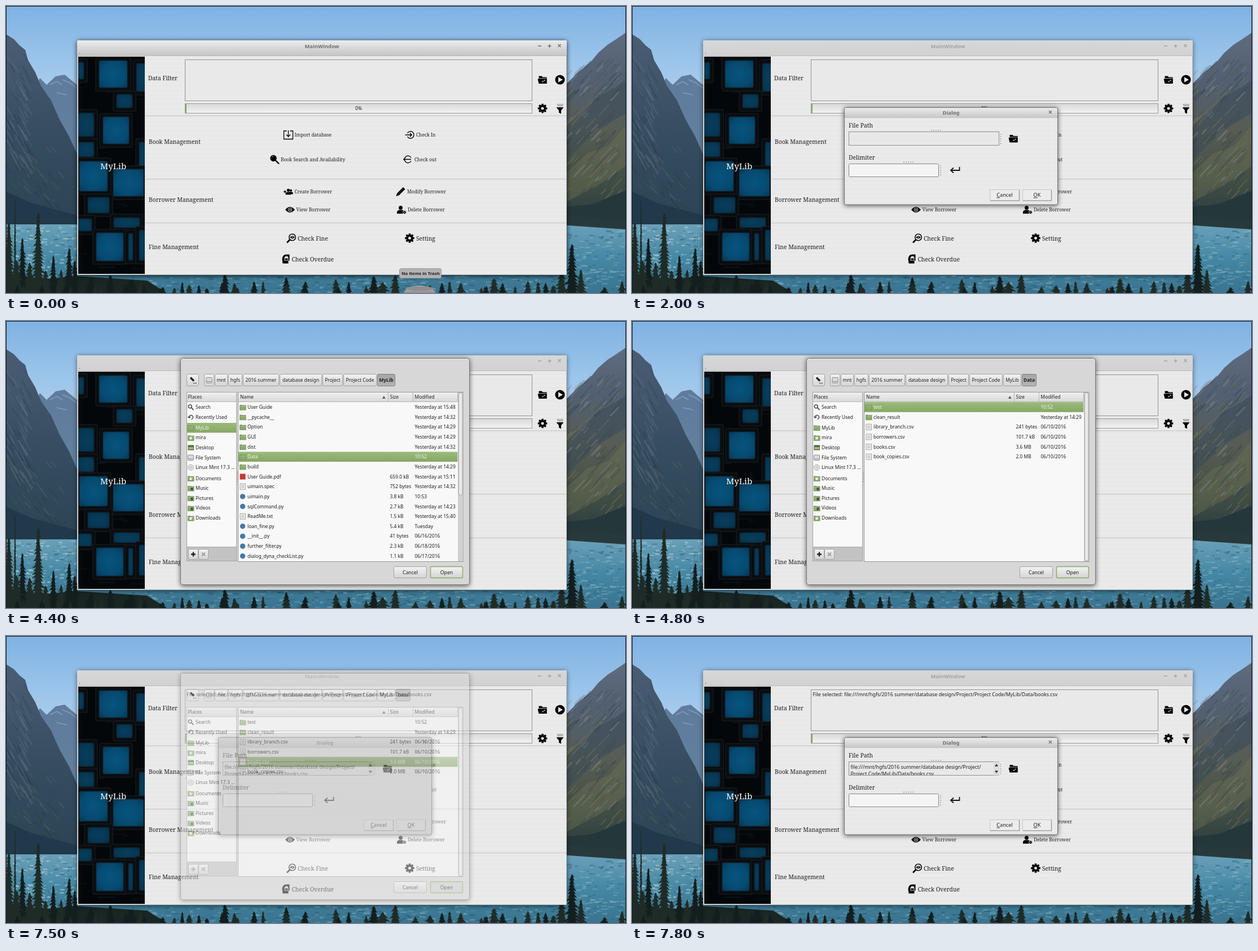
An HTML page that plays this animation: 1099x510 px, repeating every 8000 ms.

```html
<!DOCTYPE html>
<html lang="en">
<head>
<meta charset="utf-8">
<title>Library manager</title>
<style>
html, body { margin: 0; width: 1099px; height: 510px; overflow: hidden; background: #000; }
svg { display: block; }
text { white-space: pre; fill: #1e1e1e; font: 8.45px "Noto Sans", sans-serif; }
.h { font: 10.3px "Noto Serif", serif; }
.s { font: 8.35px "Noto Serif", serif; }
.q { font-size: 8.86px; }
.d { font-size: 9.2px; }
.w { font: bold 9.4px "Noto Sans", sans-serif; }
.b { font-weight: bold; }
.m { text-anchor: middle; }
.sel { fill: #f1f6ea; }
.logo { font: 15.1px "Noto Serif", serif; fill: #fff; }
</style>
</head>
<body>
<svg id="stage" width="1099" height="510" viewBox="0 0 1099 510"></svg>
<script>
const LOOP = 8000;
let seed = 7;
const rnd = () => (seed = (seed * 16807) % 2147483647) / 2147483647;
const many = (n, f) => Array.from({ length: n }, (_, i) => f(i)).join('');

const rect = (x, y, w, h, fill, more = '') => `<rect x="${x}" y="${y}" width="${w}" height="${h}" fill="${fill}" ${more}/>`;
const path = (d, fill, more = '') => `<path d="${d}" fill="${fill}" ${more}/>`;
const line = (d, col = '#000', w = 1.5, more = '') => path(d, 'none', `stroke="${col}" stroke-width="${w}" ${more}`);
const circle = (x, y, r, fill, more = '') => `<circle cx="${x}" cy="${y}" r="${r}" fill="${fill}" ${more}/>`;
const text = (x, y, s, cls = '', more = '') => `<text x="${x}" y="${y}" class="${cls}" ${more}>${s}</text>`;
const group = (id, body, more = '') => `<g id="${id}" ${more}>${body}</g>`;
const at = (x, y, body) => `<g transform="translate(${x} ${y})">${body}</g>`;
const edge = (col, r = 0) => `stroke="${col}" rx="${r}"`;
const grad = (id, ...cols) => `<linearGradient id="${id}" x2="0" y2="1">` +
  cols.map((c, i) => `<stop offset="${i / (cols.length - 1)}" stop-color="${c}"/>`).join('') + '</linearGradient>';

const defs = `<defs>
${grad('sky', '#7fb2e3', '#9cc5ea', '#b7d3e8')}
${grad('lake', '#6aa0b8', '#4587a3', '#39738f')}
${grad('ridge', '#4a5d74', '#374d61', '#2b4454')}
${grad('far', '#5f7b9d', '#62809e', '#496780')}
${grad('cliff', '#5f6c80', '#525f70', '#575d54', '#444f45', '#27393e')}
${grad('titleOn', '#ececec', '#c5c5c5')}
${grad('titleOff', '#d7d7d7', '#d2d2d2')}
${grad('btn', '#f3f3f3', '#d4d4d4')}
${grad('down', '#a5a5a5', '#b5b5b5')}
${grad('green', '#9bbb7b', '#86a765')}
${grad('head', '#f0f0f0', '#d8d8d8')}
${grad('trough', '#d9d9d9', '#f2f2f2')}
${grad('can', '#bdbdbd', '#5c5c5c')}
<radialGradient id="glow" r=".75"><stop stop-color="#07547e"/><stop offset=".6" stop-color="#064a70"/><stop offset="1" stop-color="#043350"/></radialGradient>
<pattern id="pin" width="8" height="8" patternUnits="userSpaceOnUse">${rect(0, 0, 8, 8, '#e8e8e8') + rect(0, 0, 8, 4, '#eaeaea')}</pattern>
<filter id="blur" x="-10%" y="-10%" width="120%" height="125%"><feGaussianBlur stdDeviation="4"/></filter>
<clipPath id="side"><rect x="128" y="90" width="118" height="386"/></clipPath>
<clipPath id="field"><rect x="385" y="224" width="256" height="23"/></clipPath>
</defs>`;

// Landscape
function tree(x, top, half) {
  const n = Math.ceil((514 - top) / 6);
  let left = '', right = '';
  for (let i = 1; i <= n; i++) {
    const y = top + i * 6, w = half * Math.min(1, i / n + .2);
    left = ` L${x - w * .45} ${y - 1} L${x - w * (.6 + rnd() * .7)} ${y}` + left;
    right += ` L${x + w * (.6 + rnd() * .7)} ${y} L${x + w * .45} ${y - 1}`;
  }
  return path(`M${x} ${top}${right}${left}Z`, rnd() > .5 ? '#141e1e' : '#1f2b26');
}
const streaks = (n, x, y, w, h, dx, dy, cols, more = 'opacity=".4"') => many(n, () => {
  const px = x + rnd() * w, py = y + rnd() * h, k = .4 + rnd();
  return line(`M${px} ${py}l${dx * k} ${dy * k}`, cols[rnd() * cols.length | 0], 1 + rnd() * 2, more);
});
const trees = [[5, 385, 12], [16, 345, 3], [29, 412, 10], [57, 367, 12], [42, 455, 12], [84, 443, 9], [98, 468, 9],
  [112, 430, 10], [122, 452, 9], [18, 452, 15], [70, 470, 12], [150, 482, 12], [185, 478, 9], [222, 486, 14],
  [388, 477, 11], [405, 492, 9], [497, 481, 8], [585, 485, 9], [652, 480, 12], [690, 478, 11], [668, 490, 12],
  [865, 484, 11], [880, 492, 8], [925, 488, 8], [985, 462, 11], [1003, 423, 13], [1019, 468, 9], [1092, 488, 9]];

function landscape() {
  return rect(0, 0, 1099, 200, 'url(#sky)') + rect(0, 200, 1099, 190, '#587792') +
    path('M40 170L60 128L72 140L88 125L104 122L128 142V390H40Z', 'url(#far)') +
    line('M78 140l12-6 10 6M100 131l14 6 12 9M90 154l18 4', '#a4b7ca', 1.5, 'opacity=".55"') +
    path('M0 50L14 59L24 70L34 78L39 96L52 118L62 142L80 168L95 202L112 232L128 268V390H0Z', 'url(#ridge)') +
    streaks(60, 0, 85, 35, 200, 13, 24, ['#65798c', '#26394a', '#5d7078']) +
    streaks(45, 0, 240, 95, 115, 14, 16, ['#30495a', '#50685f', '#203744']) +
    path('M0 330L45 350L126 372V392H0Z', '#21394a') +
    path('M985 144L996 136L1014 118L1036 100L1050 83L1066 69L1080 60L1099 47V392H985Z', 'url(#cliff)') +
    path('M990 300L1030 262L1068 248L1099 212V284L1050 318L990 350Z', '#6f7355', 'opacity=".4"') +
    path('M990 230L1045 165L1099 132V190L1050 220L990 276Z', '#384858', 'opacity=".5"') +
    streaks(130, 1000, 95, 95, 235, -15, 16, ['#8a9099', '#33434f', '#77775f', '#3d4a43']) +
    path('M990 357L1040 352L1099 328V394L990 390Z', '#24373b') +
    rect(0, 388, 1099, 122, 'url(#lake)') + path('M985 372L1099 380V397L1040 393L985 389Z', '#28393b') +
    streaks(230, 0, 391, 126, 112, 7, 0, ['#a3c4d0', '#c0d7de', '#2c627c'], 'opacity=".5"') +
    streaks(150, 992, 400, 104, 105, 8, 0, ['#79aabd', '#286680', '#8fbac7'], 'opacity=".5"') +
    streaks(320, 126, 480, 868, 29, 8, 0, ['#8db6c3', '#245469', '#6199ad'], 'opacity=".5"') +
    path('M0 478L60 486L126 480L250 488L285 510H0Z', '#1a2623') +
    trees.map(a => tree(...a)).join('') +
    many(45, () => tree(rnd() * 1099, 488 + rnd() * 14, 5 + rnd() * 5)) +
    path('M.5 510V.5H1098.5V510', 'none', 'stroke="#10141a"');
}

// Icons, drawn around 0,0
const spin = (n, f) => many(n, i => `<g transform="rotate(${i * 360 / n})">${f}</g>`);
const gear = circle(0, 0, 4.4, 'none', 'stroke="#000" stroke-width="3.6"') + spin(8, rect(-1.8, -8.3, 3.6, 3.5, '#000', 'rx=".6"'));
const folder = path('M-6.500-6.500h5l2 2h7v11h-14z', '#000') + path('M-8.500-1.500H7.500V7H-6.500Z', '#000') +
  line('M-6.500-2.500H6.500', '#ddd', .8) + line('M0 4.500l4-4M-.5 2l1.500 2.500M3 0l1.500 2', '#ddd', 1);
const play = circle(0, 0, 8.6, '#000') + path('M-3-4.8L5 0L-3 4.8Z', '#eee');
const funnel = path('M-6.5-2.5H6.5L2 3V9L-2 7V3Z', '#000') + line('M-5-7.5H6M-4-5H5', '#000', 1.2, 'stroke-dasharray="1.3 1.3"');
const lens = circle(-2, -2, 5.7, '#000') + line('M2 2L8 8', '#000', 2.4) + line('M-5-3a3.5 3.5 0 0 1 3-3', '#ccc', .8);
const eye = path('M-8.5 0Q0-10 8.5 0Q0 10-8.5 0Z', '#000') + circle(0, 0, 3.2, '#000', 'stroke="#e8e8e8"') + circle(0, 0, 1.2, '#e8e8e8');
const person = circle(0, -3.6, 3.5, '#000') + path('M-6.5 7V4Q-6 1-2.5.5H2.5Q6 1 6.5 4V7Z', '#000');
const icons = {
  imp: line('M-3-7H-8V7.5H8V-7H3M0-8V3M-3.5-.5L0 3.2L3.5-.5', '#000', 1.3),
  enter: line('M-4.5-3A6.2 6.2 0 1 1-4.5 3M-8.5 0H3M0-3.2L3.2 0L0 3.2', '#000', 1.4),
  leave: line('M5-3A6.2 6.2 0 1 0 5 3M5 0H-8M-5-3.2L-8.200 0L-5 3.2', '#000', 1.4),
  lens,
  add: line('M-8.5 0H-3.5M-6-2.5V2.5', '#000', 1.4) + at(4.5, 0, `<g transform="scale(.6)">${person}</g>`) + at(0, 0, `<g transform="scale(.75)">${person}</g>`),
  pen: path('M-8 8L-6.5 3L4.5-8L8-4.5L-3 6.5Z', '#000') + line('M-5 4.5L5-5.5', '#777', .6),
  eye,
  del: at(-1.5, 0, person) + circle(5.5, 4.5, 3, '#000', 'stroke="#e8e8e8"') + line('M4.5 3.5l2 2m0-2l-2 2', '#fff', .7),
  find: circle(1.5, -1.5, 5.8, '#e8e8e8', 'stroke="#000" stroke-width="1.5"') + at(1.5, -1.5, `<g transform="scale(.5)">${eye}</g>`) + line('M-3 3L-8 8', '#000', 2.6),
  gear,
  due: path('M-6 8L-7 0Q-6-8 0-8H6V3H4V8Z', '#000') + path('M-3-1Q-3-5 1-5Q4-5 4-1V3H-3Z', '#e0e0e0') + rect(-2, -1, 5, 3, '#000')
};
const item = (icon, ix, iy, tx, label, cls = 's') => at(ix, iy, icons[icon]) + text(tx, iy + (cls === 's' ? 3 : 4), label, cls);

// Main window
const tiles = [[128, 100, 10, 30], [165, 97, 50, 48], [231, 102, 18, 50], [196, 157, 28, 24], [128, 190, 28, 42],
  [128, 242, 28, 26], [172, 197, 46, 48], [236, 242, 10, 64], [190, 290, 54, 48], [130, 276, 50, 53],
  [145, 340, 38, 28], [128, 378, 24, 22], [191, 376, 46, 18], [160, 403, 48, 50], [217, 404, 8, 48], [236, 398, 10, 54]];
const sidebar = `<g clip-path="url(#side)">${rect(128, 90, 118, 386, '#04070a')}` +
  streaks(40, 128, 90, 110, 380, 22, 0, ['#15191d', '#0b2230']) +
  tiles.map(([x, y, w, h]) => rect(x - 6, y - 6, w + 12, h + 12, '#0a0c0e', edge('#1b2024', 2)) +
    rect(x, y, w, h, 'url(#glow)', `opacity="${w * h > 1500 ? 1 : .7}" ` + edge('#0d2c40', 2))).join('') + '</g>' +
  text(167, 290, 'MyLib', 'logo');

const winButtons = col => line('M943 71h6M960.500 71h6M963.500 68v6M978.500 68l5 5m0-5l-5 5', col, 1.4);
const titleBar = (fill, col) => path('M126 88V64Q126 61 129 61H991Q994 61 994 64V88Z', `url(#${fill})`) +
  text(560, 75, 'MainWindow', 'w m', `style="fill:${col}"`) + winButtons(col) + rect(130, 83, 1, 2, '#777');

const mainWindow = group('shade', rect(126, 62, 868, 418, '#000', 'rx="4" filter="url(#blur)"')) +
  rect(126, 61, 868, 417, 'url(#pin)', 'rx="3"') +
  titleBar('titleOff', '#a3a3a3') + group('active', titleBar('titleOn', '#6f6f6f')) +
  line('M126 88.500H994', '#b9b9b9', 1) + sidebar +
  line('M247 195H994M247 307.500H994M247 385.500H994', '#cbcbcb', 1.5) +
  line('M126.500 88V477.500H993.500V88', '#b7bdb9', 1) +
  text(252, 132, 'Data Filter', 'h') + text(253, 245, 'Book Management', 'h') +
  text(253, 347.500, 'Borrower Management', 'h') + text(253, 432, 'Fine Management', 'h') +
  rect(317.5, 95.5, 615, 73, '#e9e9e9', edge('#919191')) +
  group('log', text(320.5, 107, 'File selected: file:///mnt/hgfs/2016 summer/database design/Project/Project Code/MyLib/Data/books.csv', 'q')) +
  rect(317.5, 173.5, 615, 17, 'url(#trough)', edge('#989898')) + rect(318, 174, 2, 16, '#86ad5f') +
  text(625, 185, '0%', 'm') +
  at(951, 131, folder) + at(982, 131, play) + at(951, 182, gear) + at(982, 182.5, funnel) +
  item('imp', 500.5, 229, 511.5, 'Import database') + item('enter', 716, 229, 727, 'Check In') +
  item('lens', 476, 272.5, 487, 'Book Search and Availability') + item('leave', 713, 272.5, 724, 'Check out') +
  item('add', 500.5, 330, 511.5, 'Create Borrower') + item('pen', 699.500, 330, 711, 'Modify Borrower') +
  item('eye', 503.500, 362, 514.5, 'View Borrower') + item('del', 701, 362, 712, 'Delete Borrower') +
  item('find', 506, 412.5, 517, 'Check Fine', 'h') + item('gear', 715.5, 412.5, 727, 'Setting', 'h') +
  item('due', 496.500, 449.5, 506.5, 'Check Overdue', 'h');

const tip = group('tip', `<ellipse cx="733" cy="511" rx="28" ry="14" fill="url(#can)"/><ellipse cx="733" cy="502" rx="25" ry="4" fill="#8e8e8e"/>` +
  rect(697.5, 466.5, 74, 17, '#b2b2b2', edge('#9b9b9b', 3)) + text(735, 478, 'No items in Trash', 'b m', 'style="font-size:7.75px"'));

// Import dialog
const dots = (x, y, down) => line(`M${x} ${y}${down ? 'v' : 'h'}18`, '#8b8b8b', 1.4, 'stroke-dasharray="1.5 2.6"');
const qtButton = (x, w, label) => rect(x + .5, 326.5, w, 19, '#ececec', edge('#c9c9c9')) +
  line(`M${x + 1} 346H${x + w + .5}V327`, '#8d8d8d', 1.2) +
  text(x + w / 2 + .5, 339.3, `<tspan text-decoration="underline">${label[0]}</tspan>${label.slice(1)}`, 'd m');
const arrow = (y, d) => rect(641, y, 10, 12, '#dcdcdc') + path(`M643 ${y + 6 + d}h6l-3 ${-d * 2}z`, '#222');

const dialog = group('dialog', rect(376, 181, 379, 174, '#000', 'rx="4" opacity=".6" filter="url(#blur)"') +
  rect(376.5, 180.5, 378, 172.5, 'url(#pin)', edge('#6f746d', 3)) +
  path('M377 199V184Q377 181 380 181H751Q754 181 754 184V199Z', 'url(#titleOn)') +
  text(565.5, 193, 'Dialog', 'w m', 'style="fill:#6d6d6d"') + line('M739 186l5 5m0-5l-5 5', '#777', 1.5) +
  text(384, 216, 'File Path', 'h') + dots(530, 221) + dots(653.5, 227, 1) +
  rect(384.5, 223.5, 266, 24, '#e8e8e8', edge('#8f8f8f')) +
  group('chosen', `<g clip-path="url(#field)">${text(387.5, 236, 'file:///mnt/hgfs/2016 summer/database design/Project/', 'q') +
    text(387.5, 248, 'Project Code/MyLib/Data/books.csv', 'q')}</g>` + arrow(223.500, 2) + arrow(235.500, -2)) +
  at(676, 235.5, folder) + text(384, 272.5, 'Delimiter', 'h') + dots(481, 277.5) + dots(547, 283, 1) +
  rect(384.5, 280.5, 159, 23, '#f4f4f4', edge('#858585', 2)) +
  line('M580.500 286v6H565M570 287.500L565 292l5 4.500', '#111', 1.8) +
  qtButton(634, 52, 'Cancel') + qtButton(692, 51, 'OK') +
  group('dim', rect(376, 180, 379, 173, '#000', 'rx="3" opacity=".24"')));

// File chooser
const tiny = {
  dir: rect(-5, -4, 4, 3, '#78955a') + rect(-5, -3, 10.5, 8, '#8cab6c', edge('#76945a')) + line('M-4.500-1.500H5', '#b2cb97', .8),
  py: circle(0, 0, 4.7, '#4479a8'),
  pdf: rect(-5, -5, 10, 10, '#c5392f'),
  doc: rect(-4.5, -5, 9.5, 10, '#f3f3f3', edge('#a4a4a4')) + line('M-2.500-2H3M-2.500 0H3M-2.500 2H3', '#a5a5a5', .8),
  disk: rect(-5, -4.5, 10, 9.5, '#dcdcdc', edge('#888', 1)) + line('M-4 2.500H4', '#888', 1),
  disc: circle(0, 0, 5, '#e2e2e2', 'stroke="#aaa"') + circle(0, 0, 1.4, '#fff', 'stroke="#aaa"'),
  find: circle(-1.2, -1.2, 3, 'none', 'stroke="#333" stroke-width="1.3"') + line('M1 1L5 5', '#333', 1.7),
  back: line('M-3 1A3.600 3.600 0 1 1 1 4M-5-1l2 2.500L0-.5', '#333', 1.2),
  desk: rect(-5, -4.5, 10.5, 9, '#536b3b') + rect(-4, -1, 8.5, 4, '#9dbb7f')
};
tiny.mark = tiny.dir + rect(0, -1, 4, 5, '#4b4f45');
tiny.page = tiny.dir + rect(-2, -1, 4, 4, '#eef3e8');

const places = [['find', 'Search', 153], ['back', 'Recently Used', 170.6], ['dir', 'MyLib', 189.5], ['page', 'mira', 207.3],
  ['desk', 'Desktop', 225], ['disk', 'File System', 242.6], ['disc', 'Linux Mint 17.3 ...', 260.3], ['page', 'Documents', 279.5],
  ['mark', 'Music', 297], ['mark', 'Pictures', 314.7], ['mark', 'Videos', 332.4], ['page', 'Downloads', 350]];
const placeList = on => (on ? rect(320.5, 181, 88, 17.500, 'url(#green)') : '') +
  places.map(([i, s, y]) => at(327.5, y, tiny[i]) + text(336, y + 3, s, on && s === 'MyLib' ? 'sel' : '')).join('');

const Y = 'Yesterday at ';
const code = [['dir', 'User Guide', '', Y + '15:48'], ['dir', '__pycache__', '', Y + '14:32'], ['dir', 'Option', '', Y + '14:29'],
  ['dir', 'GUI', '', Y + '14:29'], ['dir', 'dist', '', Y + '14:32'], ['dir', 'Data', '', '10:52'], ['dir', 'build', '', Y + '14:29'],
  ['pdf', 'User Guide.pdf', '659.0 kB', Y + '15:11'], ['doc', 'uimain.spec', '752 bytes', Y + '14:32'], ['py', 'uimain.py', '3.8 kB', '10:53'],
  ['py', 'sqlCommand.py', '2.7 kB', Y + '14:23'], ['doc', 'ReadMe.txt', '1.5 kB', Y + '15:40'], ['py', 'loan_fine.py', '5.4 kB', 'Tuesday'],
  ['py', '__init__.py', '41 bytes', '06/16/2016'], ['py', 'further_filter.py', '2.3 kB', '06/18/2016'], ['py', 'dialog_dyna_checkList.py', '1.1 kB', '06/17/2016']];
const data = [['dir', 'test', '', '10:52'], ['dir', 'clean_result', '', Y + '14:29'], ['doc', 'library_branch.csv', '241 bytes', '06/10/2016'],
  ['doc', 'borrowers.csv', '101.7 kB', '06/10/2016'], ['doc', 'books.csv', '3.6 MB', '06/10/2016'], ['doc', 'book_copies.csv', '2.0 MB', '06/10/2016']];
const fileList = (rows, sel) => rows.map(([icon, name, size, when], i) => {
  const y = 153 + 17.65 * i, c = i === sel ? 'sel' : '';
  return (c && rect(412, y - 8.8, 388.500, 17.65, 'url(#green)')) + at(419.5, y, tiny[icon]) +
    text(428, y + 3, name, c) + text(680.5, y + 3, size, c) + text(724.5, y + 3, when, c);
}).join('');

const button = (x, y, w, h, body, on) => rect(x + .5, y + .5, w - 1, h - 1, on ? 'url(#down)' : 'url(#btn)', edge(on ? '#808080' : '#a2a2a2', 2)) + body;
const crumbs = [['mnt', 370, 23], ['hgfs', 394, 25], ['2016 summer', 420, 64], ['database design', 485, 75], ['Project', 561, 36],
  ['Project Code', 598, 59], ['MyLib', 658, 32], ['Data', 691, 26]];
const crumbBar = n => crumbs.slice(0, n).map(([s, x, w], i) =>
  button(x, 94, w, 22, text(x + w / 2, 108, s, i === n - 1 ? 'b m' : 'm'), i === n - 1)).join('');
const plus = on => button(323, 405, 18, 19, line('M328 414.500h8M332 410.500v8', on ? '#222' : '#999', 2.4));

const chooser = group('chooser', rect(309, 67, 513, 404, '#000', 'rx="5" opacity=".6" filter="url(#blur)"') +
  rect(309.5, 66.5, 512, 402, '#d7d7d7', edge('#7b7b7b', 4)) + line('M312 67.500H819', '#eee', 1) +
  button(320, 94, 22, 22, line('M327 100.500l6 6', '#222', 3.6) + line('M332 110.500h6', '#222', 1.5, 'stroke-dasharray="1.2 1"')) +
  button(351, 94, 18, 22, at(360, 105, tiny.disk)) + group('crumbA', crumbBar(7)) + group('crumbB', crumbBar(8)) +
  rect(320.5, 126.5, 88, 300, '#f9f9f9', edge('#a3a3a3')) + rect(321, 127, 87, 16.5, 'url(#head)') +
  line('M321 143.500H408', '#b9b9b9', 1) + text(322.5, 138.2, 'Places') +
  group('placeA', placeList(true)) + group('placeB', placeList(false)) +
  rect(321, 402, 87, 24, '#c3c3c3') + line('M321 401.500H408', '#a8a8a8', 1) +
  group('plusOn', plus(true)) + group('plusOff', plus(false)) +
  button(341, 405, 18, 19, line('M347 411.500l6 6m0-6l-6 6', '#a0a0a0', 2)) + dots(410.5, 268, 1) +
  rect(411.5, 126.5, 399, 301, '#f8f8f8', edge('#979797')) + rect(412, 127, 388.5, 16.5, 'url(#head)') +
  line('M412 143.500H800.500V127M677.500 127v17M721.500 127v17', '#b5b5b5', 1) +
  text(415, 138.2, 'Name') + text(680.5, 138.2, 'Size') + text(724.5, 138.2, 'Modified') + path('M667 138l2.800-5 2.800 5z', '#555') +
  group('a0', fileList(code, 0)) + group('a5', fileList(code, 5)) + group('b0', fileList(data, 0)) + group('b4', fileList(data, 4)) +
  rect(801, 127, 9.5, 300, '#d0d0d0') + rect(802.5, 127.5, 6.5, 182, '#eaeaea', edge('#a0a0a0', 3) + ' id="thumb"') +
  button(687, 436, 59, 21, text(716.5, 450, 'Cancel', 'm', 'style="font-size:8.67px"')) +
  rect(752.5, 436.5, 57, 20, 'url(#btn)', edge('#86ad5f', 2) + ' id="open" stroke-width="1.4"') + text(781, 450, 'Open', 'm', 'style="font-size:8.67px"'));

document.getElementById('stage').innerHTML = defs + landscape() + mainWindow + tip + dialog + chooser;

// Motion: [start time, value] steps per part
const tracks = {
  dialog: [[0, 0], [1800, .35], [1900, .75], [2000, 1]],
  dim: [[0, 0], [2800, .4], [2900, .8], [3000, 1], [7700, .5], [7800, 0]],
  chooser: [[0, 0], [2800, .35], [2900, .75], [3000, 1], [7500, .5], [7600, 0]],
  tip: [[0, 1], [1300, 0]],
  active: [[0, 1], [1800, 0]],
  shade: [[0, .75], [1800, .5]],
  log: [[0, 0], [7500, 1]],
  chosen: [[0, 0], [7500, 1]],
  a0: [[0, 1], [4400, 0]],
  a5: [[0, 0], [4400, 1], [4600, 0]],
  b0: [[0, 0], [4800, 1], [6100, 0]],
  b4: [[0, 0], [6100, 1]],
  crumbA: [[0, 1], [4800, 0]],
  crumbB: [[0, 0], [4800, 1]],
  placeA: [[0, 1], [4800, 0]],
  placeB: [[0, 0], [4800, 1]],
  plusOn: [[0, 1], [4600, 0], [4800, 1], [6100, 0]],
  plusOff: [[0, 0], [4600, 1], [4800, 0], [6100, 1]]
};
const parts = Object.entries(tracks).map(([id, steps]) => [document.getElementById(id), steps]);
const thumb = document.getElementById('thumb'), open = document.getElementById('open');

function draw() {
  const t = performance.now() % LOOP;
  for (const [el, steps] of parts) {
    const v = steps.filter(s => s[0] <= t).pop()[1];
    el.style.display = v ? '' : 'none';
    el.style.opacity = v;
  }
  thumb.setAttribute('height', t < 4600 ? 182 : 299);
  open.setAttribute('fill', t < 7200 ? 'url(#btn)' : t < 7300 ? '#f4f4f4' : '#d0d0d0');
  requestAnimationFrame(draw);
}
draw();
</script>
</body>
</html>
```
